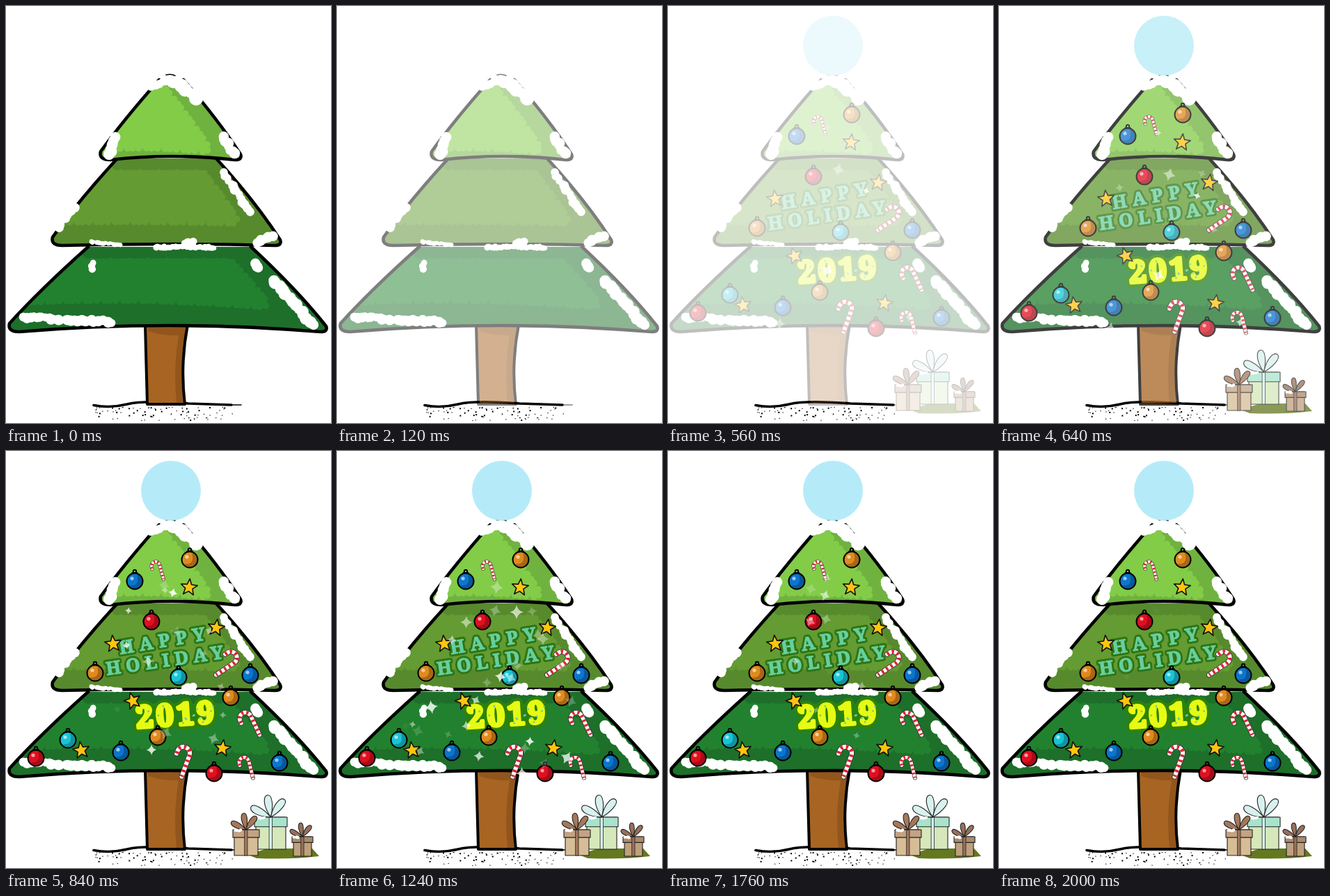
An HTML page that plays this animation: 467 by 599 pixels, repeating every 2.04 s.

```html
<!DOCTYPE html>
<html>
<head>
<meta charset="utf-8">
<style>
html, body { margin: 0; width: 100%; height: 100%; overflow: hidden; background: #fff }
svg { display: block; width: 100%; height: 100% }
text { font-family: "Noto Serif", "DejaVu Serif", serif; font-weight: 900; stroke-linejoin: round }
</style>
</head>
<body>
<svg id="stage" viewBox="0 0 467 599" fill="none" stroke-linecap="round" stroke-linejoin="round"></svg>
<script>
const LOOP = 2040, STEP = 40;
const stage = document.getElementById('stage');

let seed = 7;
const rnd = (lo = 0, hi = 1) => lo + (hi - lo) * (seed = seed * 16807 % 2147483647) / 2147483647;
const times = (n, make) => Array.from({ length: n }, (_, i) => make(i));
const many = (n, make) => times(n, make).join('');

function ground() {
  return '<path d="M126 573.5Q150 578 174 572T262 571L324 573" stroke="#000" stroke-width="3.6"/>' +
    many(85, () => {
      const w = rnd() < .3 ? 2 : 1.2;
      return `<rect x="${rnd(128, 325)}" y="${576 + 19 * rnd() ** 1.5}" width="${w}" height="${w}" fill="#000"/>`;
    });
}

const trunk =
  '<path d="M201 455L204 572H255Q250 515 261 455Z" fill="#a86422"/>' +
  '<path d="M203 458H261Q250 515 255 571H245Q240 520 248 473Q225 474 205 467Z" fill="#92561c"/>' +
  '<path d="M200 458L203 572H257Q250 515 261 458" stroke="#000" stroke-width="4"/>' +
  '<path d="M300 573H338" stroke="#000" stroke-width="1.6"/>';

// A tier runs from l..r at height y to L..R at height Y; its light face is a shifted, clipped copy.
function tier(id, { l, r, y, L, R, Y, sag, bulge, dx, dy, dark, light }) {
  const m = (y + Y) / 2;
  const d = `M${l} ${y}Q${(l + L) / 2 - bulge} ${m} ${L} ${Y - 12}Q${L - 3} ${Y} ${L + 14} ${Y}` +
    `Q${(L + R) / 2} ${Y - 2 * sag} ${R - 8} ${Y}Q${R + 3} ${Y} ${R} ${Y - 8}Q${(r + R) / 2 + bulge} ${m} ${r} ${y}`;
  const bumps = 'stroke-width="10" stroke-dasharray="0 11 0 7 0 9"';
  return `<clipPath id="${id}"><path d="${d}"/></clipPath><path d="${d}" fill="${dark}"/>
    <g clip-path="url(#${id})"><path d="${d}" transform="translate(${-dx} ${-dy})" fill="${light}" stroke="${light}" ${bumps}/>
    ${id === 'top' ? '' : `<path d="M${l} ${y + 8}H${r}" stroke="${dark}" ${bumps.replace('10', '18')}/>`}</g>
    <path d="${d}" stroke="#000" stroke-width="4.6"/>`;
}
const tiers =
  tier('low', { l: 118, r: 352, y: 346, L: 5, R: 460, Y: 468, sag: 9, bulge: 12, dx: 86, dy: 36, dark: '#1d6f2a', light: '#22812e' }) +
  tier('mid', { l: 160, r: 302, y: 219, L: 67, R: 394, Y: 344, sag: 2, bulge: 11, dx: 63, dy: 32, dark: '#578a2d', light: '#649b32' }) +
  tier('top', { l: 220, r: 255, y: 106, L: 136, R: 337, Y: 221, sag: 5, bulge: 9, dx: 47, dy: 12, dark: '#70b23f', light: '#82cc48' });

// A drift of snow: overlapping lumps from one point to another.
function drift([x, y, X, Y, r]) {
  const n = Math.ceil(Math.hypot(X - x, Y - y) / r * 1.5) + 1;
  return many(n, i => {
    const k = i / (n - 1), j = r * .3;
    return `<circle cx="${x + (X - x) * k + rnd(-j, j)}" cy="${y + (Y - y) * k + rnd(-j, j)}" r="${r * rnd(.75, 1.15)}" fill="#fff"/>`;
  });
}
const snow = [
  [210, 115, 237, 105, 6], [240, 106, 274, 132, 9],
  [157, 190, 148, 213, 8], [311, 188, 328, 213, 7],
  [75, 317, 100, 288, 6], [314, 240, 351, 297, 6], [361, 340, 382, 329, 7],
  [122, 339, 164, 343, 3], [215, 346, 298, 347, 4], [256, 342, 270, 340, 6],
  [125, 370, 124, 377, 5], [25, 446, 150, 454, 7],
  [358, 370, 363, 376, 8], [384, 393, 440, 457, 9]
].map(drift).join('');

const colors = { b: '#0b76cf', o: '#e08a1e', r: '#e10f1f', c: '#18c4d6' };
const ball = ([x, y, c]) => `<g transform="translate(${x} ${y})" stroke="#000" stroke-width="2">
  <circle cy="-14" r="2.2"/><path d="M-3-11H3" stroke-width="4"/><circle r="11.5" fill="${colors[c]}"/>
  <path d="M3-10A10.5 10.5 0 1 1-8 6Q8 8 3-10Z" fill="#000" stroke="none" opacity=".25"/>
  <circle cx="-4" cy="-4" r="2.6" fill="#fff" stroke="none" opacity=".6"/></g>`;

function star([x, y, turn]) {
  const pts = times(10, i => {
    const r = i % 2 ? 5.4 : 12.5, a = i * Math.PI / 5 + turn;
    return [x + r * Math.sin(a), y - r * Math.cos(a)];
  });
  return `<polygon points="${pts}" fill="#ffc40f" stroke="#111" stroke-width="1.6"/>`;
}

function cane([x, y, size, turn]) {
  const stroke = (color, width, extra = '') =>
    `<path d="M-7 3V0A7 7 0 0 1 7 0V25" stroke="${color}" stroke-width="${width}" ${extra}/>`;
  return `<g transform="translate(${x} ${y}) rotate(${turn}) scale(${size})">${stroke('#333', 6)}${stroke('#fff', 4.6)}
    ${stroke('#dc2530', 4.6, 'stroke-linecap="butt" stroke-dasharray="2.6 3.4"')}</g>`;
}

// Lettering is drawn twice: a wide edge, then a thickened face.
function label(s, x, y, turn, size, gap, face, edge, width, bold) {
  const layer = (color, w) => `<text font-size="${size}" letter-spacing="${gap}" fill="${color}" stroke="${color}" stroke-width="${w}">${s}</text>`;
  return `<g transform="translate(${x} ${y}) rotate(${turn})">${layer(edge, width)}${layer(face, bold)}</g>`;
}

function gift(x, y, w, h, bow, body, lid, ribbon) {
  const m = x + w / 2;
  const petals = [-62, -8, 38].map(a =>
    `<path transform="translate(${m} ${y}) rotate(${a})" d="M0 0C${-bow * .3} ${-bow * .6} ${-bow * .2} ${-bow} 0 ${-bow}S${bow * .2} ${-bow * .5} 0 0" fill="${ribbon}"/>`);
  return `<g stroke="#222" stroke-width="1.1"><path d="M${x + 2} ${y}h${w - 4}v${h}h${4 - w}z" fill="${body}"/>
    <path d="M${x} ${y}h${w}v${h * .3}h${-w}z" fill="${lid}"/>
    <path d="M${m - 2} ${y}h4v${h}h-4z" fill="${ribbon}" stroke-width=".8"/>${petals.join('')}</g>` +
    drift([x + 3, y + 1, x + w * .3, y + 1, 2]);
}

const decor =
  '<circle cx="237" cy="57" r="43" fill="#b5ebf8"/>' +
  label('HAPPY', 164, 292, -9.5, 26, 8.2, '#66cf9f', '#2f7512', 7, 1.2) +
  label('HOLIDAY', 145, 322, -8.2, 26, 7.6, '#66cf9f', '#2f7512', 7, 1.2) +
  label('2019', 188, 398, -4, 44, 4.6, '#e6fb14', '#2f8205', 13, 4.5) +
  many(14, () => `<circle cx="${rnd(194, 298)}" cy="${rnd(366, 392)}" r="1.4" fill="#66cf9f"/>`) +
  [[263, 196, .1], [302, 254, .15], [154, 277, -.1], [182, 359, -.3], [108, 430, -.15], [311, 427, .15]].map(star).join('') +
  [[215, 165, .85, -15], [323, 297, 1.25, 56], [344, 384, 1.2, -25], [255, 434, 1.3, 20], [342, 447, 1, -14]].map(cane).join('') +
  [[185, 187, 'b'], [264, 156, 'o'], [209, 245, 'r'], [128, 319, 'o'], [248, 325, 'c'], [351, 322, 'b'], [323, 354, 'o'],
    [89, 415, 'c'], [43, 441, 'r'], [165, 433, 'b'], [218, 411, 'o'], [299, 463, 'r'], [393, 448, 'b']].map(ball).join('') +
  '<path d="M348 580L375 571H440L450 582Q410 587 360 585Z" fill="#64781f"/>' +
  gift(357, 526, 47, 46, 32, '#d6e8ba', '#a9e3cd', '#d8f1ee') +
  gift(326, 544, 38, 37, 24, '#d6bd96', '#c3a384', '#a5785a') +
  gift(411, 554, 30, 28, 20, '#bfa07c', '#a98b6c', '#96705a');

stage.innerHTML = ground() + `<g id="scene">${trunk}${tiers}${snow}
  <path d="M230 99Q237 97 243 100" stroke="#000" stroke-width="1.6"/><g id="decor">${decor}</g></g><g id="sparks" fill="#fff"></g>`;
const [scene, deco, sparks] = ['scene', 'decor', 'sparks'].map(id => document.getElementById(id));

// Sparkles fall within the tree's cone, flaring up quickly and fading slowly.
const glints = times(54, () => {
  const el = document.createElementNS('http://www.w3.org/2000/svg', 'path');
  el.setAttribute('d', 'M0-10Q1.8-1.8 10 0Q1.8 1.8 0 10Q-1.8 1.8-10 0Q-1.8-1.8 0-10Z');
  sparks.append(el);
  const y = rnd(165, 465), reach = (y - 90) * .42;
  return { el, y, x: 232 + rnd(-reach, reach), peak: rnd(560, 1680), size: rnd(.5, 1), turn: rnd(-10, 30), glow: rnd(.4, 1) };
});

function draw(now) {
  const t = Math.floor(now % LOOP / STEP) * STEP, festive = t >= 560;
  scene.setAttribute('opacity', festive ? Math.min(1, (t - 520) / 160) : Math.max(0, 1 - t / 240));
  for (const part of [deco, sparks]) part.setAttribute('display', festive ? 'inline' : 'none');
  for (const g of glints) {
    const d = t - g.peak, a = 1 - (d < 0 ? -d / 160 : d / 400);
    g.el.setAttribute('opacity', Math.max(0, a) * g.glow);
    g.el.setAttribute('transform', `translate(${g.x} ${g.y + d * .09}) rotate(${g.turn}) scale(${g.size})`);
  }
  requestAnimationFrame(() => draw(performance.now() - start));
}
const start = performance.now();
draw(0);
</script>
</body>
</html>
```
